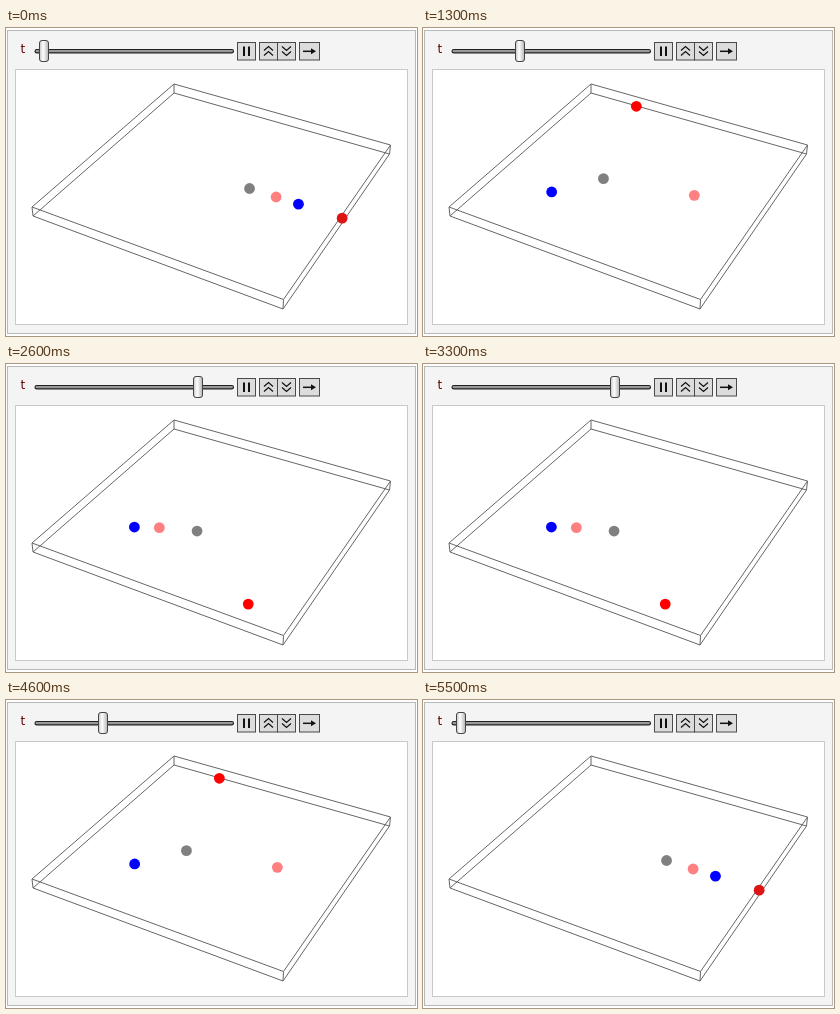
An HTML page for the animation above (6000 ms loop, 411x308 px).

```html
<!DOCTYPE html>
<html>
<head>
<meta charset="utf-8">
<style>
  html, body { margin: 0; width: 100%; height: 100%; overflow: hidden; background: #fff; }
  svg { display: block; width: 411px; height: 308px; }
  text { font: 12px "DejaVu Sans", sans-serif; fill: #600000; }
  .box { fill: none; stroke: #666; stroke-width: 1; }
  .btn { fill: #dcdcdc; stroke: #4a4a4a; }
  .icon { fill: none; stroke: #111; stroke-width: 1.2; }
</style>
</head>
<body>
<svg viewBox="0 0 411 308">
  <defs>
    <linearGradient id="knob">
      <stop offset="0" stop-color="#c4c4c4"/>
      <stop offset=".4" stop-color="#fff"/>
      <stop offset="1" stop-color="#b4b4b4"/>
    </linearGradient>
  </defs>
  <rect x="1.5" y="2.5" width="408" height="303" fill="#f4f4f4" stroke="#b8b8b8"/>
  <rect x="9.5" y="41.5" width="392" height="255" fill="#fff" stroke="#c8c8c8"/>
  <text x="14.5" y="25">t</text>

  <rect x="29" y="21.5" width="198.5" height="3.4" rx="1.7" fill="#999" stroke="#222" stroke-width="1.1"/>
  <rect id="thumb" x="-4.5" y="12.5" width="9" height="21" rx="2.5" fill="url(#knob)" stroke="#444"/>

  <g class="btn">
    <rect x="231.5" y="14.5" width="18" height="17.5"/>
    <rect x="253.5" y="14.5" width="18" height="17.5"/>
    <rect x="271.5" y="14.5" width="18" height="17.5"/>
    <rect x="293.5" y="14.5" width="20" height="17.5"/>
  </g>
  <path d="M238 18.5V28M243 18.5V28" class="icon" style="stroke-width:2"/>
  <path d="M258 22.5l4.5-4 4.5 4M258 27.5l4.5-4 4.5 4M276 18.5l4.5 4 4.5-4M276 23.5l4.5 4 4.5-4" class="icon"/>
  <path d="M297 23.3h9" class="icon" style="stroke-width:1.5"/>
  <path d="M305 20.3l5 3-5 3z" fill="#111"/>

  <path class="box" d="M168 56L384.5 117 277.5 271.5 26 179zM168 65L383.5 126 277 281 27 188zM168 56v9M384.5 117l-1 9M277.5 271.5l-.5 9.5M26 179l1 9"/>
  <g id="planets"></g>
</svg>
<script>
const NS = "http://www.w3.org/2000/svg";
const thumb = document.getElementById("thumb");
const group = document.getElementById("planets");

// Orbit radius, angular speed and vertical tilt (px), relative to the outermost planet
const planets = [
  { r: 0.254, speed: 7.81, tilt: 1.1, color: "#808080" },
  { r: 0.4745, speed: 3.058, tilt: 1.8, color: "#ff8080" },
  { r: 0.656, speed: 1.881, tilt: 0, color: "#0000ff" },
  { r: 1, speed: 1, tilt: 4, color: "#ff0000" }
];
for (const p of planets) {
  p.dot = document.createElementNS(NS, "circle");
  p.dot.setAttribute("r", 5.4);
  p.dot.setAttribute("fill", p.color);
  group.append(p.dot);
}

// Perspective view of the orbital plane
function project(x, y) {
  const w = 0.86185 - 0.04792 * x + 0.090235 * y;
  return [(184.235 + 89.375 * x + 73.14 * y) / w,
          (130.12 + 24.68 * x - 44.94 * y) / w];
}

// Forward through 25 steps, then back
function stepAt(ms) {
  if (ms < 500) return 0;
  if (ms < 3100) return Math.min(25, Math.floor((ms - 500) / 100) + 1);
  return Math.max(0, 24 - Math.floor((ms - 3100) / 100));
}

function draw(now) {
  const step = stepAt(now % 6000);
  const angle = step ? 1.16 + 14.68 * (step - 1) : 0;
  thumb.setAttribute("transform", `translate(${Math.round(38.4 + angle / 2.017)})`);
  for (const p of planets) {
    const a = angle * p.speed * Math.PI / 180;
    const [x, y] = project(p.r * Math.cos(a), p.r * Math.sin(a));
    p.dot.setAttribute("cx", x);
    p.dot.setAttribute("cy", y - p.tilt * Math.sin(a));
  }
  // The outer planet sits behind the box edge at the start
  planets[3].dot.setAttribute("fill", step < 2 ? "#dc1414" : planets[3].color);
}

const start = performance.now();
function tick() {
  draw(performance.now() - start);
  requestAnimationFrame(tick);
}
tick();
</script>
</body>
</html>
```
